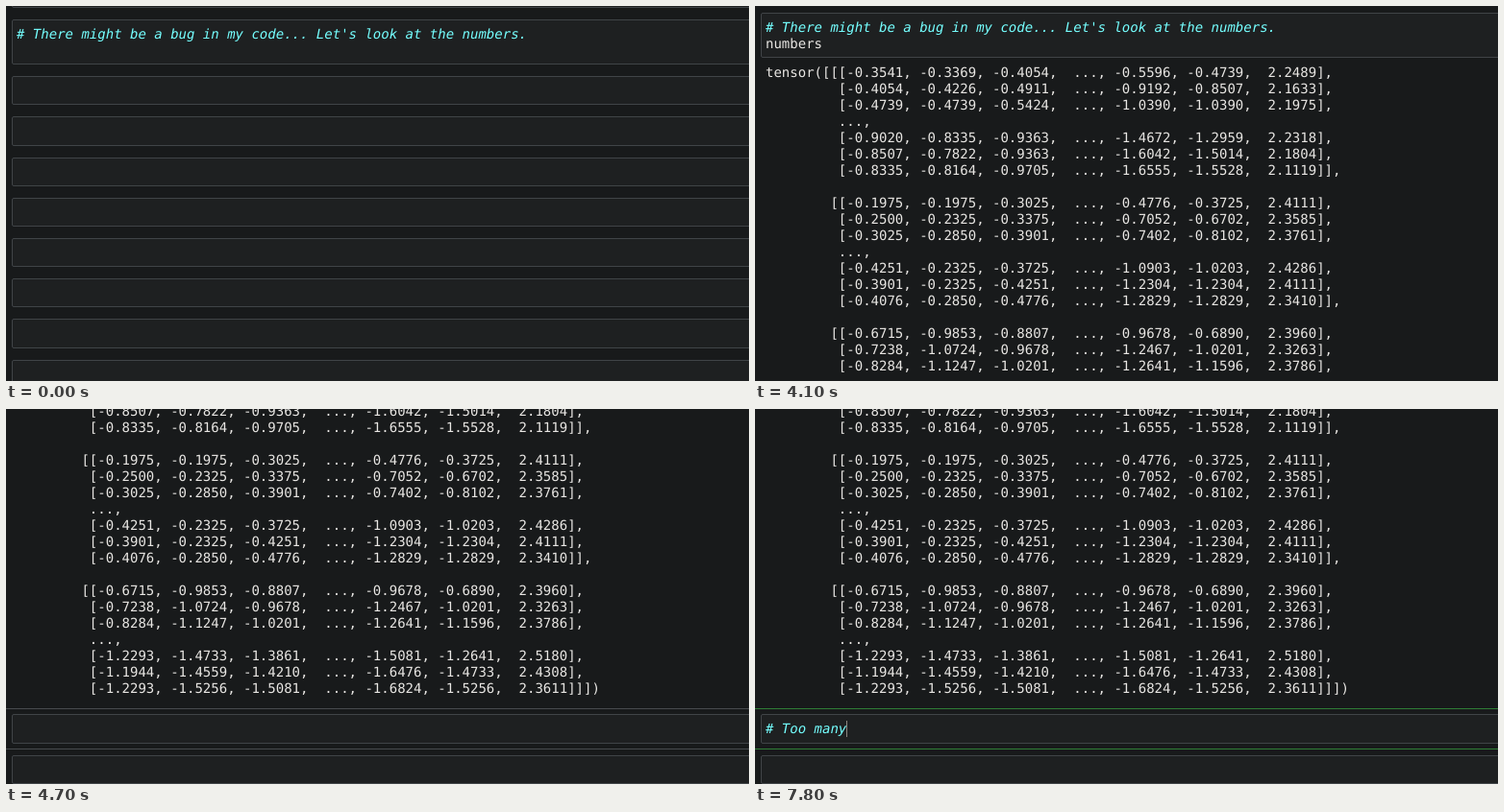
An HTML page for the animation above (8 s loop, 773 by 391 pixels).

```html
<!DOCTYPE html>
<html lang="en">
<head>
<meta charset="utf-8">
<title>Notebook</title>
<style>
  html, body { margin: 0; width: 100%; height: 100%; overflow: hidden; background: #181a1b; }
  #stage { position: relative; width: 773px; height: 391px; overflow: hidden; }
  #stage * { position: absolute; box-sizing: border-box; }
  .cell { left: 6px; width: 780px; background: #1e2021; border: 1px solid #404447; border-radius: 2px; }
  pre { left: 11px; margin: 0; padding-top: 1px; color: #e8e6e3; font: 14px/17px "DejaVu Sans Mono", monospace; text-rendering: geometricPrecision; }
  pre i { position: static !important; color: #75ffff; }
  #frame { left: -2px; width: 777px; border: 1px solid; }
  #caret { width: 1px; height: 17px; background: #8c8780; }
</style>
</head>
<body>
<div id="stage">
  <div id="frame"></div>
  <pre id="first"><i># There might be a bug in my code... Let's look at the numbers.</i>
<span id="name" style="position:static"></span></pre>
  <pre id="output">tensor([[[-0.3541, -0.3369, -0.4054,  ..., -0.5596, -0.4739,  2.2489],
         [-0.4054, -0.4226, -0.4911,  ..., -0.9192, -0.8507,  2.1633],
         [-0.4739, -0.4739, -0.5424,  ..., -1.0390, -1.0390,  2.1975],
         ...,
         [-0.9020, -0.8335, -0.9363,  ..., -1.4672, -1.2959,  2.2318],
         [-0.8507, -0.7822, -0.9363,  ..., -1.6042, -1.5014,  2.1804],
         [-0.8335, -0.8164, -0.9705,  ..., -1.6555, -1.5528,  2.1119]],

        [[-0.1975, -0.1975, -0.3025,  ..., -0.4776, -0.3725,  2.4111],
         [-0.2500, -0.2325, -0.3375,  ..., -0.7052, -0.6702,  2.3585],
         [-0.3025, -0.2850, -0.3901,  ..., -0.7402, -0.8102,  2.3761],
         ...,
         [-0.4251, -0.2325, -0.3725,  ..., -1.0903, -1.0203,  2.4286],
         [-0.3901, -0.2325, -0.4251,  ..., -1.2304, -1.2304,  2.4111],
         [-0.4076, -0.2850, -0.4776,  ..., -1.2829, -1.2829,  2.3410]],

        [[-0.6715, -0.9853, -0.8807,  ..., -0.9678, -0.6890,  2.3960],
         [-0.7238, -1.0724, -0.9678,  ..., -1.2467, -1.0201,  2.3263],
         [-0.8284, -1.1247, -1.0201,  ..., -1.2641, -1.1596,  2.3786],
         ...,
         [-1.2293, -1.4733, -1.3861,  ..., -1.5081, -1.2641,  2.5180],
         [-1.1944, -1.4559, -1.4210,  ..., -1.6476, -1.4733,  2.4308],
         [-1.2293, -1.5256, -1.5081,  ..., -1.6824, -1.5256,  2.3611]]])</pre>
  <pre id="second"><i id="note"></i></pre>
  <div id="caret"></div>
</div>
<script>
const LOOP = 8000, RUN = 2800, SCROLL = 4100;
const PITCH = 42.2, EMPTY_H = 29.2, OUTPUT_H = 404.2, CHAR = 8.428;
const GREEN = '#2f7d36', GRAY = '#474b4e';
const scrollSteps = [7, 35, 66, 97, 123, 146, 159];

// Each entry: time of a keystroke and the number of characters shown from then on.
const nameKeys = [[1500, 1], [1600, 2], [1800, 3], [1900, 4], [2100, 6], [2400, 7]];
const noteKeys = [[6600, 1], [6700, 2], [7000, 3], [7100, 4], [7200, 5], [7400, 6],
                  [7600, 7], [7700, 9], [7800, 10]];

const el = id => document.getElementById(id);
const stage = el('stage'), frame = el('frame'), caret = el('caret');

// The cell above, the first code cell, then the empty ones.
const cells = Array.from({ length: 11 }, () => {
  const cell = document.createElement('div');
  cell.className = 'cell';
  stage.prepend(cell);
  return cell;
});

const typed = (keys, t) => keys.reduce((n, [at, count]) => t >= at ? count : n, 0);

function span(node, top, bottom) {
  node.style.top = Math.round(top) + 'px';
  node.style.height = Math.round(bottom) - Math.round(top) + 1 + 'px';
}

function show(node, visible) {
  node.style.display = visible ? 'block' : 'none';
}

function draw(t) {
  const ran = t >= RUN;
  const step = Math.floor((t - SCROLL) / 100);
  const scroll = step < 0 ? 0 : scrollSteps[Math.min(step, scrollSteps.length - 1)];
  const emptyTop = 73.2 + (ran ? OUTPUT_H : 0) - scroll;

  span(cells[0], -28 - scroll, 1 - scroll);
  span(cells[1], 14 - scroll, 60 - scroll);
  cells.slice(2).forEach((cell, i) => {
    const top = emptyTop + PITCH * i;
    span(cell, top, top + EMPTY_H);
  });

  const nameCount = typed(nameKeys, t), noteCount = typed(noteKeys, t);
  el('name').textContent = 'numbers'.slice(0, nameCount);
  el('note').textContent = '# Too many'.slice(0, noteCount);
  el('first').style.top = 21 - scroll + 'px';
  el('output').style.top = 68 - scroll + 'px';
  el('second').style.top = Math.round(emptyTop) + 7 + 'px';
  show(el('output'), ran);

  const editing = t >= 600 && !ran || t >= 5800;
  show(frame, t >= 600);
  frame.style.borderColor = editing ? GREEN : GRAY;
  if (ran) span(frame, Math.round(emptyTop) - 6, Math.round(emptyTop + EMPTY_H) + 6);
  else span(frame, 8, 66);

  const blinkedOff = t >= 1100 && t < 1500 || t >= 6400 && t < 6600;
  show(caret, editing && !blinkedOff);
  caret.style.left = Math.floor(11 + CHAR * (ran ? noteCount : nameCount)) + 'px';
  caret.style.top = (ran ? Math.round(emptyTop) + 7 : 38) + 'px';
}

const start = performance.now();
function tick() {
  draw((performance.now() - start) % LOOP);
  requestAnimationFrame(tick);
}
tick();
</script>
</body>
</html>
```
